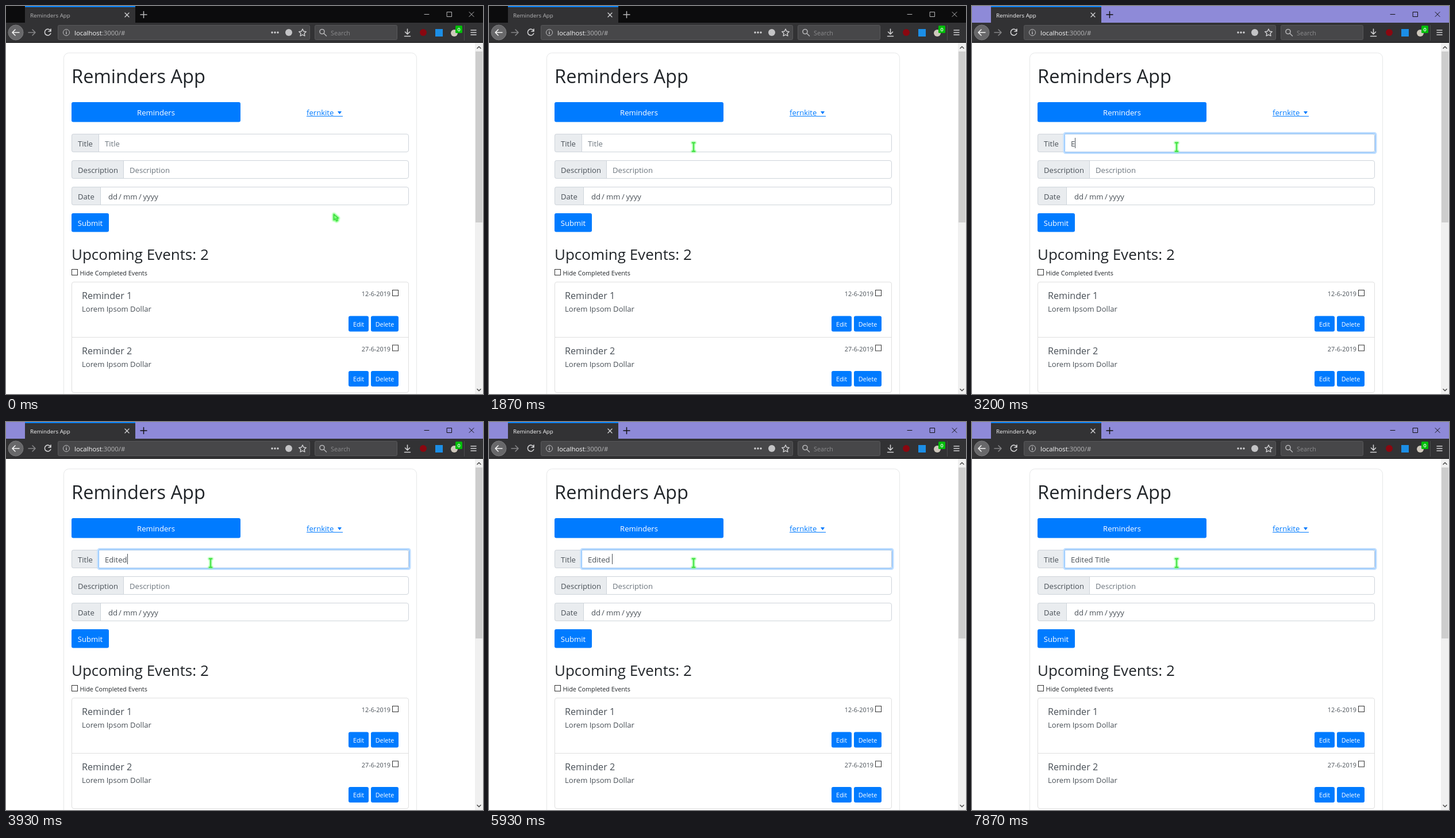
Animation of 830 by 674 pixels, one loop 8000 ms. Source, as an HTML page:

```html
<!DOCTYPE html>
<html lang="en">
<head>
<meta charset="utf-8">
<title>Reminders App</title>
<style>
  html, body { margin: 0; width: 100%; height: 100%; overflow: hidden; background: #fff; }
  svg { display: block; width: 830px; height: 674px; }
  text { font: 13.1px "Open Sans", "Noto Sans", sans-serif; white-space: pre; fill: #495057; }
  .h1 { font-size: 32.6px; fill: #212529; }
  .h2 { font-size: 26px; fill: #212529; }
  .h5 { font-size: 16.2px; }
  .small { font-size: 10.8px; }
  .dark { fill: #212529; }
  .onBlue { fill: #fff; }
  .mid { text-anchor: middle; }
  .hint { fill: #6c757d; }
  .blue { fill: #007bff; }
  .line { fill: none; stroke-linecap: round; stroke-linejoin: round; }
  .tool { stroke: #d2d2d4; stroke-width: 1.6; }
  #tabTitle { font-size: 9.75px; }
</style>
</head>
<body>
<svg id="stage" viewBox="0 0 830 674" xmlns="http://www.w3.org/2000/svg"></svg>
<script>
const LOOP = 8000;
const stage = document.getElementById('stage');
const byId = id => document.getElementById(id);

const box = (x, y, w, h, fill, extra = '') =>
  `<rect x="${x}" y="${y}" width="${w}" height="${h}" fill="${fill}" ${extra}/>`;
const outline = (x, y, w, h, r, stroke, fill = '#fff') =>
  box(x + .5, y + .5, w - 1, h - 1, fill, `rx="${r}" stroke="${stroke}"`);
const label = (x, y, text, cls = '', extra = '') =>
  `<text x="${x}" y="${y}" class="${cls}" ${extra}>${text}</text>`;
const line = (d, cls = 'tool', extra = '') => `<path d="${d}" class="line ${cls}" ${extra}/>`;
const button = (x, y, w, h, text, baseline, cls = '') =>
  box(x, y, w, h, '#007bff', 'rx="3"') + label(x + w / 2, baseline, text, `mid onBlue ${cls}`);
const checkbox = (x, y) => box(x + .5, y + .5, 10, 10, '#fff', 'stroke="#333"');

function titleBar() {
  return box(0, 0, 830, 29, '#0c0c0d', 'id="bar"') +
    box(33, 0, 192, 29, '#323234') + box(33, 0, 192, 2, '#0a84ff') +
    label(42, 20, 'Reminders App', '', 'id="tabTitle"') +
    line('M207 12l7 7m0-7l-7 7', '', 'stroke="#d8d8da" stroke-width="1.3"') +
    `<g id="controls" class="line">
      <path d="M234 15h11m-5.5-5.5v11" stroke-width="1.5"/>
      <path d="M728 14.5h8M767.5 10.5h8v8h-8zM806 10.5l8 8m0-8l-8 8"/>
    </g>`;
}

function toolbar() {
  return box(0, 29, 830, 34, '#323234') + box(0, 63, 830, 1, '#0c0c0d') +
    '<circle cx="17" cy="46" r="13" fill="#68686a" stroke="#7b7b7d"/>' +
    line('M23 46H11m5-5l-5 5 5 5', 'tool', 'style="stroke:#f4f4f4"') +
    line('M39 46h12m-5-5l5 5-5 5', 'tool', 'style="stroke:#858587"') +
    line('M77.5 43a5.4 5.4 0 1 0 .3 4.5M78 40v4h-4') +
    outline(90, 33, 439, 26, 2, '#58585a', '#474749') +
    '<circle cx="105" cy="46" r="5.5" fill="none" stroke="#bebec0"/>' +
    line('M105 45.5v3m0-5.3v.1', 'tool', 'style="stroke-width:1.3"') +
    `<text x="119" y="51" style="font-size:11.4px;fill:#f9f9fa">localhost<tspan fill="#b4b4b6">:3000/#</tspan></text>` +
    [463, 468, 473].map(x => `<circle cx="${x}" cy="46" r="1.7" fill="#d2d2d4"/>`).join('') +
    '<circle cx="492" cy="46" r="6" fill="#c4c4c6"/>' +
    line('M516 40l1.9 4 4.4.6-3.2 3 .8 4.4-3.9-2.1-3.9 2.1.8-4.4-3.2-3 4.4-.6z', 'tool', 'style="stroke-width:1.4"') +
    outline(537, 33, 144, 26, 2, '#58585a', '#474749') +
    '<circle cx="550" cy="44.5" r="4" fill="none" stroke="#b4b4b6" stroke-width="1.6"/>' +
    line('M553 47.5l4.5 4.5', 'tool', 'style="stroke:#b4b4b6"') +
    label(565, 51, 'Search', 'small', 'style="fill:#8b8b8d"') +
    line('M698.5 40v9m-4-4l4 4 4-4M693.500 52.500h10') +
    '<circle cx="726" cy="46" r="6" fill="#8a0710"/>' +
    box(747, 40, 13, 13, '#1c8ee6') +
    '<circle cx="780" cy="47" r="6" fill="#cfc8bc"/>' +
    box(782, 34, 12, 13, '#00bd0a', 'rx="1.5"') +
    label(788, 44, '0', 'mid onBlue', 'style="font-size:9px;font-weight:600"') +
    box(797, 33, 1, 27, '#4b4b4d') +
    line('M809 42h9m-9 4h9m-9 4h9');
}

function scrollBar() {
  return box(816, 64, 14, 610, '#f0f0f0') + box(817, 79, 12, 297, '#cdcdcd') +
    line('M820 73.500l3-3 3 3M820 665.500l3 3 3-3', '', 'stroke="#505050" stroke-width="1.6"');
}

function field(y, split, name, content) {
  return outline(114, y, 587, 32, 3.5, '#ced4da') +
    `<path d="M${split + .5} ${y + .5}H117.500a3 3 0 0 0-3 3v25a3 3 0 0 0 3 3H${split + .5}z" fill="#e9ecef" stroke="#ced4da"/>` +
    label(125, y + 22, name) + content;
}

function reminder(y, name, date) {
  return label(132, y + 29, name, 'h5') + label(132, y + 51, 'Lorem Ipsom Dollar') +
    label(669, y + 24, date, 'small', 'text-anchor="end"') + checkbox(672, y + 13) +
    button(596, y + 58.5, 35, 27, 'Edit', y + 76.5, 'small') +
    button(635, y + 58.5, 48, 27, 'Delete', y + 76.5, 'small');
}

function page() {
  return outline(100, 81, 615, 640, 9, '#e6e7e8') +
    label(114, 134, 'Reminders App', 'h1') +
    button(114, 167, 294, 34.5, 'Reminders', 190) +
    label(523, 190, 'fernkite', 'blue') + box(523, 191, 63, 1, '#007bff') +
    '<path d="M577 183h7l-3.500 5z" fill="#007bff"/>' +
    field(222, 161, 'Title', `
      <g id="focus" fill="none">
        <rect x="160" y="220.500" width="543" height="35" rx="3" stroke="#bfdeff" stroke-width="3"/>
        <rect x="161.500" y="222" width="540" height="32" rx="1.500" stroke="#80bdff"/>
      </g>` + label(172, 244, '', '', 'id="entry"') + box(172, 229, 1, 18, '#495057', 'id="caret"')) +
    field(268, 204, 'Description', label(215, 290, 'Description', 'hint')) +
    field(314, 164, 'Date',
      label(178, 336, 'dd') + label(196, 336, '/') + label(204, 336, 'mm') +
      label(231, 336, '/') + label(238.5, 336, 'yyyy')) +
    button(114, 360, 65, 32.5, 'Submit', 382) +
    label(114, 441, 'Upcoming Events: 2', 'h2') +
    checkbox(114, 457) + label(128.5, 468, 'Hide Completed Events', 'small dark') +
    outline(114, 479, 587, 193, 3.5, '#dfdfdf') + box(115, 575, 585, 1, '#dfdfdf') +
    reminder(480, 'Reminder 1', '12-6-2019') + reminder(575.5, 'Reminder 2', '27-6-2019');
}

// Each pointer has a soft green glow around a sharper core; its hotspot is at 0,0.
function pointer(id, d, width) {
  return `<g id="${id}" class="line">
    <path d="${d}" stroke="#7dff7d" stroke-width="${width}" filter="url(#soft)"/>
    <path d="${d}" stroke="#35d435" stroke-width="1.300"/>
  </g>`;
}

stage.innerHTML = `<defs><filter id="soft" x="-100%" y="-100%" width="300%" height="300%">
    <feGaussianBlur stdDeviation="1"/></filter></defs>` +
  page() + scrollBar() + titleBar() + toolbar() +
  pointer('arrow', 'M2.500 2v9.500l2.500-2 2 4 2-1-1.800-3.700 3-.3z', 5) +
  pointer('beam', 'M-2.500-7.500h2.200q.3 0 .3.800v13.400q0 .8-.3.800h-2.200M2.500-7.500h-2.200M2.500 7.500h-2.200', 4);

// [time, typed text, caret visible]
const TYPING = [
  [0, '', 0], [2000, '', 1], [2530, '', 0], [3070, '', 1],
  [3200, 'E', 1], [3470, 'Ed', 1], [3530, 'Edi', 1], [3670, 'Edit', 1], [3730, 'Edite', 1],
  [3930, 'Edited', 1], [4070, 'Edited', 0], [4130, 'Edited ', 1],
  [4330, 'Edited t', 1], [4470, 'Edited ti', 1], [4530, 'Edited tit', 1],
  [4670, 'Edited titl', 0], [4730, 'Edited titl', 1], [5000, 'Edited tit', 1],
  [5200, 'Edited ti', 1], [5330, 'Edited t', 1], [5530, 'Edited tT', 1],
  [5730, 'Edited t', 1], [5870, 'Edited ', 0], [5930, 'Edited ', 1],
  [6070, 'Edited T', 0], [6270, 'Edited T', 1], [6600, 'Edited T', 0],
  [6730, 'Edited Tt', 1], [6870, 'Edited T', 1], [7000, 'Edited Ti', 1],
  [7130, 'Edited Tit', 1], [7270, 'Edited Titl', 1], [7330, 'Edited Title', 1],
  [7870, 'Edited Title', 0]
];
const MOVES = [1400, 1470, 1530, 1600, 1670, 1730, 1800, 1870];
const FIELD_TOPS = [222, 268, 314];

function drawPointer(t) {
  const p = MOVES.filter(at => at <= t).length / MOVES.length;
  const eased = p * p * (3 - 2 * p);
  const x = Math.round(568 - 212 * eased), y = Math.round(360 - 115 * eased);
  const overField = FIELD_TOPS.some(top => y >= top && y < top + 32);
  for (const id of ['arrow', 'beam']) {
    byId(id).setAttribute('transform', `translate(${x} ${y})`);
    byId(id).style.display = (id === 'beam') === overField ? '' : 'none';
  }
}

function drawEntry(t) {
  const [, text, caretOn] = TYPING.findLast(step => step[0] <= t);
  const entry = byId('entry');
  entry.textContent = text;
  const width = text ? entry.getComputedTextLength() : 0;
  byId('caret').setAttribute('x', 172 + Math.round(width));
  byId('caret').style.display = caretOn ? '' : 'none';
  entry.textContent = text || 'Title';
  entry.setAttribute('class', text ? '' : 'hint');
}

function drawWindow(active) {
  byId('bar').setAttribute('fill', active ? '#8e8ad8' : '#0c0c0d');
  byId('tabTitle').style.fill = active ? '#f9f9fa' : '#b5b5b7';
  byId('controls').style.stroke = active ? '#111' : '#b8b8ba';
  byId('focus').style.display = active ? '' : 'none';
}

const start = performance.now();
function frame() {
  const t = (performance.now() - start) % LOOP;
  drawPointer(t);
  drawEntry(t);
  drawWindow(t >= 2000);
  requestAnimationFrame(frame);
}
frame();
</script>
</body>
</html>
```
